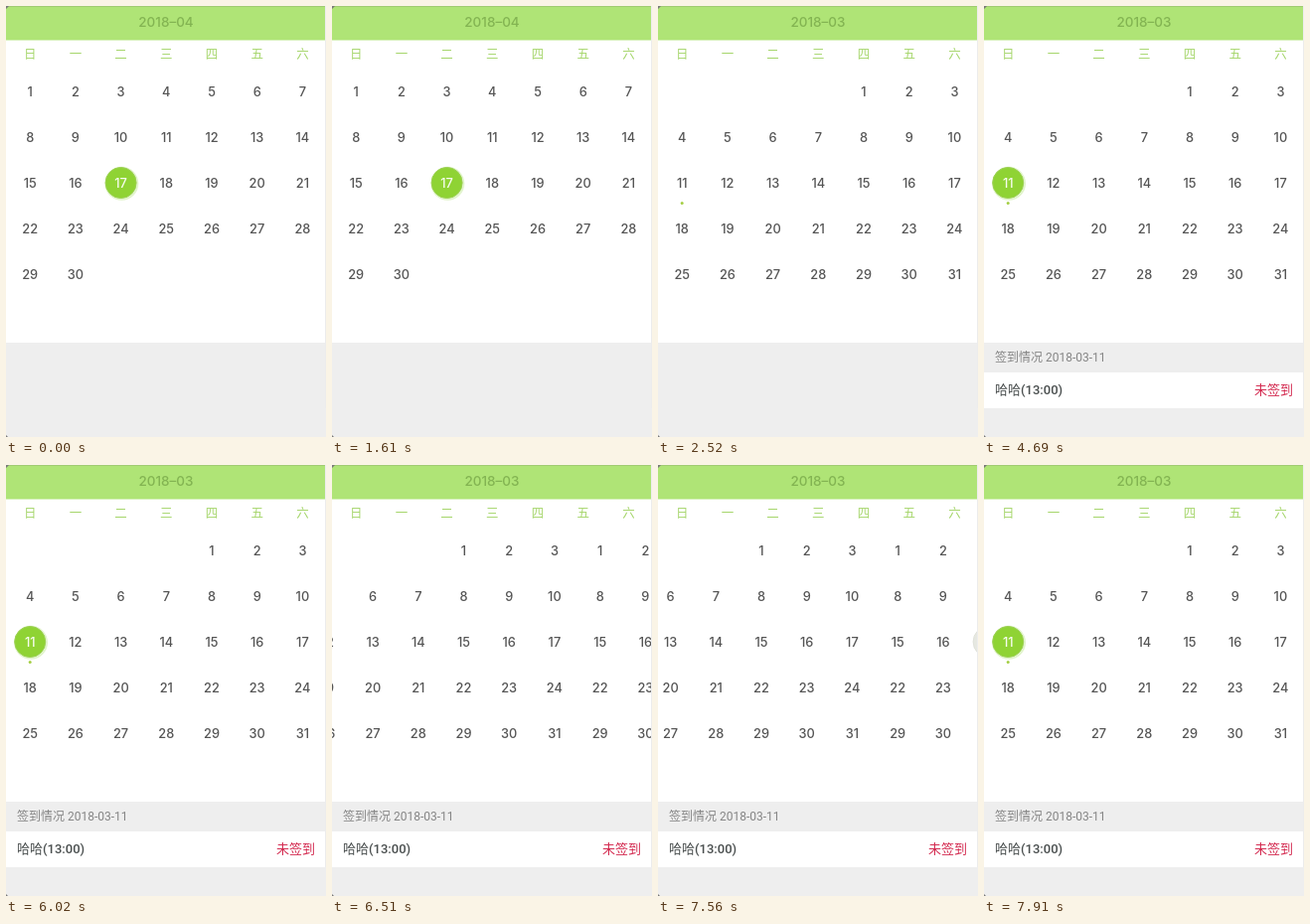
Animation, 322 px wide and 434 px high, one loop 8 s. Source, as an HTML page:

```html
<!DOCTYPE html>
<html lang="zh-CN">
<head>
<meta charset="utf-8">
<title>Calendar</title>
<style>
  html, body { margin: 0; width: 100%; height: 100%; overflow: hidden; background: #eee; }
  svg { display: block; width: 100%; height: 100%; }
  text { font-family: Roboto, 'Noto Sans CJK SC', 'Noto Sans CJK JP', 'Noto Sans CJK', sans-serif; font-weight: 500; }
  .num { font-family: Inter, sans-serif; }
  .thin { font-weight: 400; }
</style>
</head>
<body>
<svg id="stage" viewBox="0 0 322 434"></svg>
<script>
const NS = 'http://www.w3.org/2000/svg';
const LOOP = 8000, TICK = 70;
const PAGE = 320, COL = 45.7, ROW = 46, LEFT = 24.2, TOP = 86;
const SWIPE_BACK = [2100, 7490], TAP = 4690, SWIPE_NEXT = 6440;
const NEXT_X = [-28, -74.5, -142, -218, -268, -295, -309, -316, -319, -PAGE];
const INK = '#555';

const stage = document.getElementById('stage');

function add(parent, tag, attrs, content) {
  const el = document.createElementNS(NS, tag);
  for (const k in attrs) el.setAttribute(k, attrs[k]);
  if (content !== undefined) el.textContent = content;
  parent.appendChild(el);
  return el;
}
const rect = (p, x, y, width, height, fill) => add(p, 'rect', { x, y, width, height, fill });
const label = (p, s, x, y, size, fill, anchor = 'middle', cls = '') =>
  add(p, 'text', { x, y, 'font-size': size, fill, 'text-anchor': anchor, class: cls }, s);
const show = (el, on) => el.setAttribute('visibility', on ? 'visible' : 'hidden');

function cell(first, day) {
  const i = first + day - 1;
  return { x: LEFT + i % 7 * COL, y: TOP + Math.floor(i / 7) * ROW };
}

// One month page with a single highlightable day.
function month(left, first, days, marked) {
  const g = add(pages, 'g', { transform: `translate(${left} 0)` });
  const c = cell(first, marked);
  const halo = add(g, 'circle', { cx: c.x + .8, cy: c.y + .8, r: 17, fill: '#e2f4cd' });
  const disc = add(g, 'circle', { cx: c.x, cy: c.y, r: 15.5 });
  let num;
  for (let d = 1; d <= days; d++) {
    const p = cell(first, d);
    const t = label(g, d, p.x, p.y + 4.8, 12.8, INK, 'middle', 'num');
    if (d === marked) num = t;
  }
  return { g, at: c, mark(fill, rim, selected) {
    show(disc, fill);
    show(halo, selected);
    disc.setAttribute('fill', fill || 'none');
    disc.setAttribute('stroke', rim);
    num.setAttribute('fill', selected ? '#f6fcee' : INK);
  } };
}

rect(stage, 0, 0, 322, 434, '#eee');
rect(stage, 0, 34, 322, 305, '#fff');
const pages = add(stage, 'g', {});
const march = month(0, 4, 31, 11);
const april = month(PAGE, 0, 30, 17);
add(march.g, 'circle', { cx: march.at.x, cy: march.at.y + 20.5, r: 1.5, fill: '#a5cf45' });

rect(stage, 0, 0, 322, 34, '#afe476');
rect(stage, 0, 34, 322, 1, '#d9f2bf');
rect(stage, 0, 0, 322, 1, '#9fcb70');
const title = label(stage, '', 161, 20.8, 13.5, '#83b452', 'middle', 'num');
[...'日一二三四五六'].forEach((s, i) => label(stage, s, LEFT + i * COL, 53, 12.5, '#a6d66c'));

const detail = add(stage, 'g', {});
label(detail, '签到情况 2018-03-11', 11, 358, 12, '#858585', 'start', 'thin');
rect(detail, 0, 369, 322, 36, '#fff');
label(detail, '哈哈(13:00)', 11, 391, 13, '#4a4f4f', 'start');
label(detail, '未签到', 311, 391, 13, '#d3284e', 'end');

rect(stage, 321, 0, 1, 405, '#ececec');
add(stage, 'path', { d: 'M0 0H3L0 3ZM0 434V432L2 434Z', fill: '#777' });

// Flick that decays to rest on the earlier month.
function flick(t) {
  const n = t / TICK;
  return n >= 6 ? 0 : -103 * Math.exp(-.8 * (n - 1));
}

function scrollX(t) {
  if (t < SWIPE_BACK[0]) return -PAGE;
  if (t < SWIPE_NEXT) return flick(t - SWIPE_BACK[0]);
  if (t < SWIPE_BACK[1]) {
    const n = Math.round((t - SWIPE_NEXT) / TICK);
    return NEXT_X[Math.min(n, NEXT_X.length - 1)];
  }
  return flick(t - SWIPE_BACK[1]);
}

function render(time) {
  const t = Math.floor(time % LOOP / TICK) * TICK;
  const x = scrollX(t), tapped = t >= TAP;
  pages.setAttribute('transform', `translate(${x} 0)`);
  title.textContent = x < -PAGE / 2 ? '2018–04' : '2018–03';
  march.mark(tapped && '#8fd334', '#9bd052', tapped);
  april.mark(tapped ? '#e6e8e1' : '#8fd334', tapped ? '#e0e2da' : '#9bd052', !tapped);
  show(detail, tapped);
}

const start = performance.now();
function loop() {
  render(performance.now() - start);
  requestAnimationFrame(loop);
}
loop();
</script>
</body>
</html>
```
